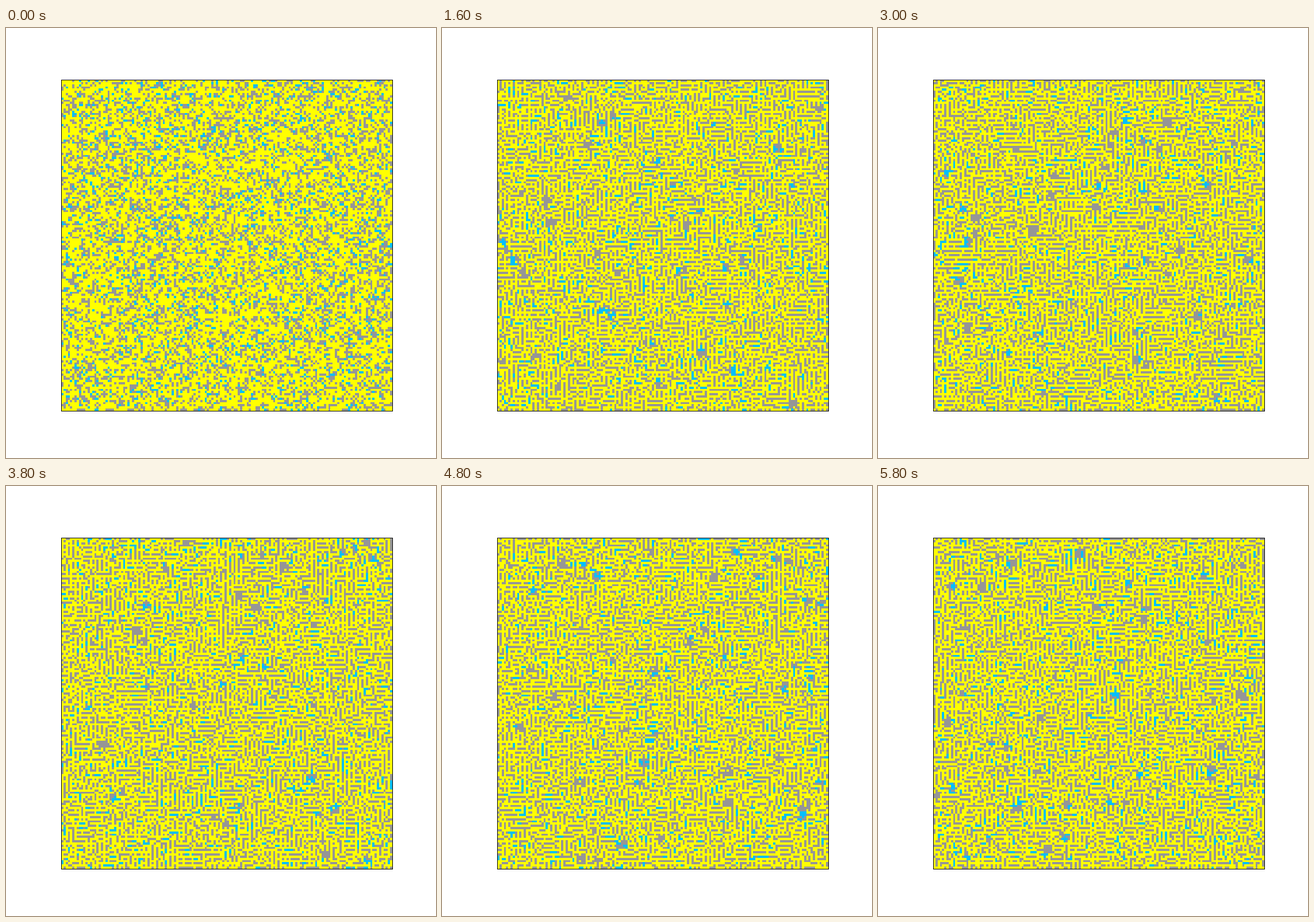
A matplotlib script for the animation above (6000 ms loop, 748 px wide and 748 px high).

```python
import numpy as np
import matplotlib.pyplot as plt
from matplotlib.animation import FuncAnimation
from matplotlib.colors import ListedColormap

SIZE, DPI = 748, 64
LEFT, TOP, SIDE = 96, 90, 576
N, FRAMES, INTERVAL = 150, 30, 200
COLORS = ["#969696", "#00bfff", "#ffff00"]
GRAY, BLUE, YELLOW = range(3)

rng = np.random.default_rng(11)


def shifted(a, dy, dx):
    return np.roll(a, (dy, dx), (0, 1))


def neighbors(live):
    return sum(shifted(live, dy, dx)
               for dy in (-1, 0, 1) for dx in (-1, 0, 1) if dy or dx)


def sweep(live):
    """Crowded cells die and free cells fill up, one sublattice at a time."""
    for k in rng.permutation(4):
        y, x = divmod(int(k), 2)
        part = (slice(y, None, 2), slice(x, None, 2))
        count = neighbors(live)[part]
        p = 1 / (1 + np.exp(1.8 * (count - 5.35)))
        p = np.where(count == 0, 0.1, p)
        live[part] = rng.random(p.shape) < p


def open_voids(live, number=45):
    for _ in range(number):
        h, w = rng.integers(2, 5, 2)
        y, x = rng.integers(0, N - 4, 2)
        live[y:y + h, x:x + w] &= rng.random((h, w)) < 0.08


def paint(live, seed_rate, spread):
    """Color the dead cells; blue leaks into dead cells next to it."""
    dead = live == 0
    blue = dead & (rng.random((N, N)) < seed_rate)
    for _ in range(2):
        near = (shifted(blue, 1, 0) | shifted(blue, -1, 0)
                | shifted(blue, 0, 1) | shifted(blue, 0, -1))
        blue |= dead & near & (rng.random((N, N)) < spread)
    return np.where(live == 1, YELLOW, np.where(blue, BLUE, GRAY))


def simulate(steps):
    live = (rng.random((N, N)) < 0.63).astype(int)
    states = [paint(live, 0.2, 0)]
    for _ in range(steps):
        sweep(live)
        sweep(live)
        open_voids(live)
        states.append(paint(live, 0.065, 0.4))
    return states


states = simulate(FRAMES - 2)

fig = plt.figure(figsize=(SIZE / DPI, SIZE / DPI), dpi=DPI, facecolor="white")
ax = fig.add_axes([LEFT / SIZE, 1 - (TOP + SIDE) / SIZE, SIDE / SIZE, SIDE / SIZE])
ax.set(xticks=[], yticks=[])
for spine in ax.spines.values():
    spine.set(linewidth=72 / DPI, edgecolor="black")
image = ax.imshow(states[0], cmap=ListedColormap(COLORS), vmin=0, vmax=2,
                  interpolation="nearest", aspect="auto")


def update(i):
    # the start state is shown twice
    image.set_data(states[max(i - 1, 0)])
    return [image]


anim = FuncAnimation(fig, update, frames=FRAMES, interval=INTERVAL,
                     repeat=True, repeat_delay=0)
plt.show()
```
